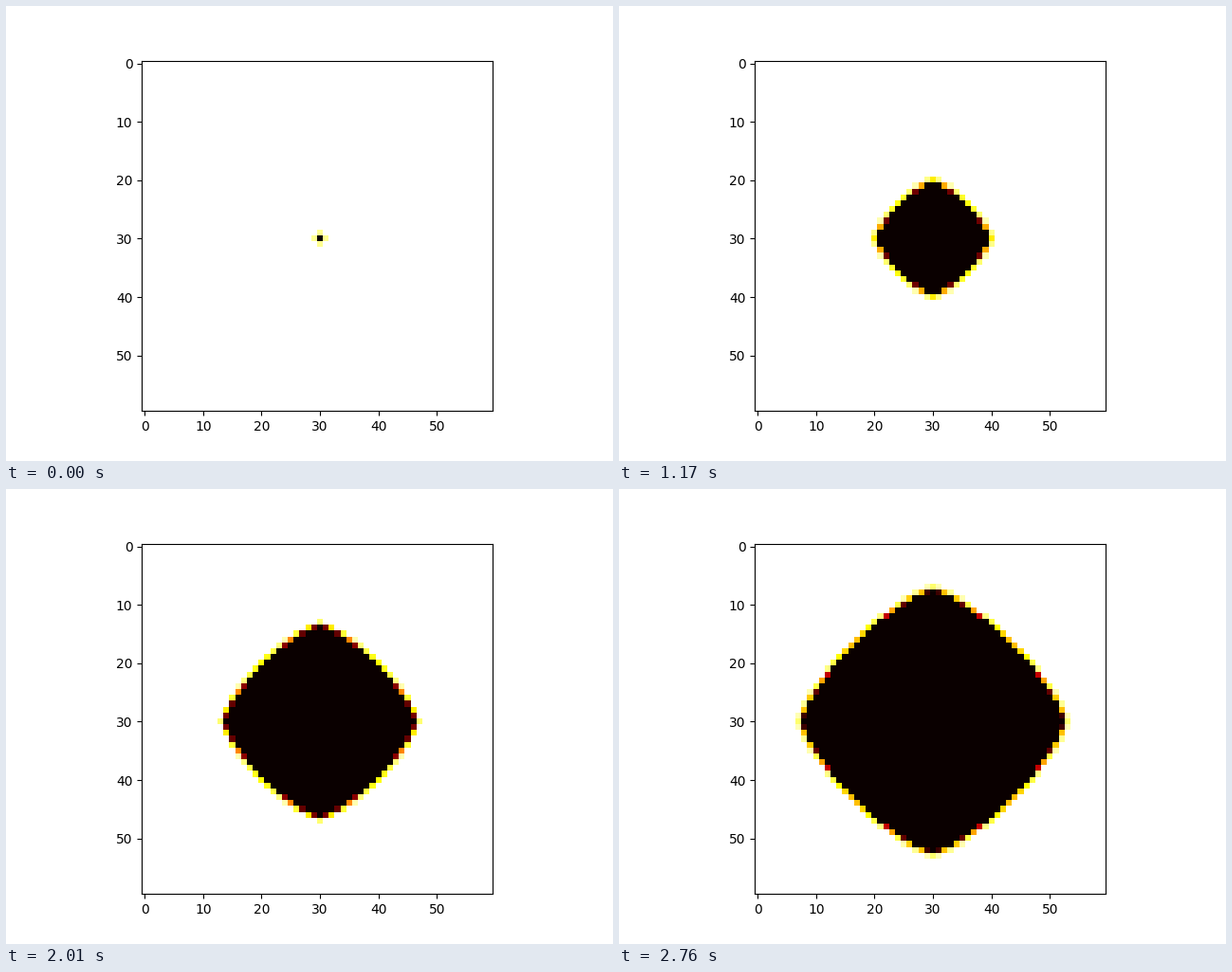
A matplotlib script that plays this animation: 640 px wide and 480 px high, repeating every 3 s.

```python
import numpy as np
import matplotlib.pyplot as plt
from matplotlib.animation import FuncAnimation

SIZE, MID = 60, 30
FRAMES, INTERVAL, LAST = 100, 30, 92
POWER = 1.34             # front shape: 1 is a diamond, 2 a circle
PACE = 4.16              # steps the front needs per cell
SPARK, GROWTH = 0.11, 1.82


def arrival_times():
    """Step at which the front reaches each cell."""
    offset = np.abs(np.arange(SIZE) - MID)
    dx, dy = np.meshgrid(offset, offset)
    radius = (dx**POWER + dy**POWER) ** (1 / POWER)
    return PACE * (radius - 1)


ARRIVAL = arrival_times()


def fuel(step):
    """Fuel left in each cell: full until the front arrives, then burning faster."""
    age = np.clip(step - ARRIVAL, -5, 8)
    burnt = np.where(age > -0.6, SPARK * GROWTH**age, 0)
    return 1 - np.minimum(burnt, 1)


fig, ax = plt.subplots(figsize=(6.4, 4.8), dpi=100)
image = ax.imshow(fuel(0), cmap="hot", vmin=0, vmax=1)


def update(frame):
    image.set_data(fuel(min(frame, LAST)))
    return [image]


anim = FuncAnimation(fig, update, frames=FRAMES, interval=INTERVAL,
                     repeat=True, repeat_delay=0)
plt.show()
```
